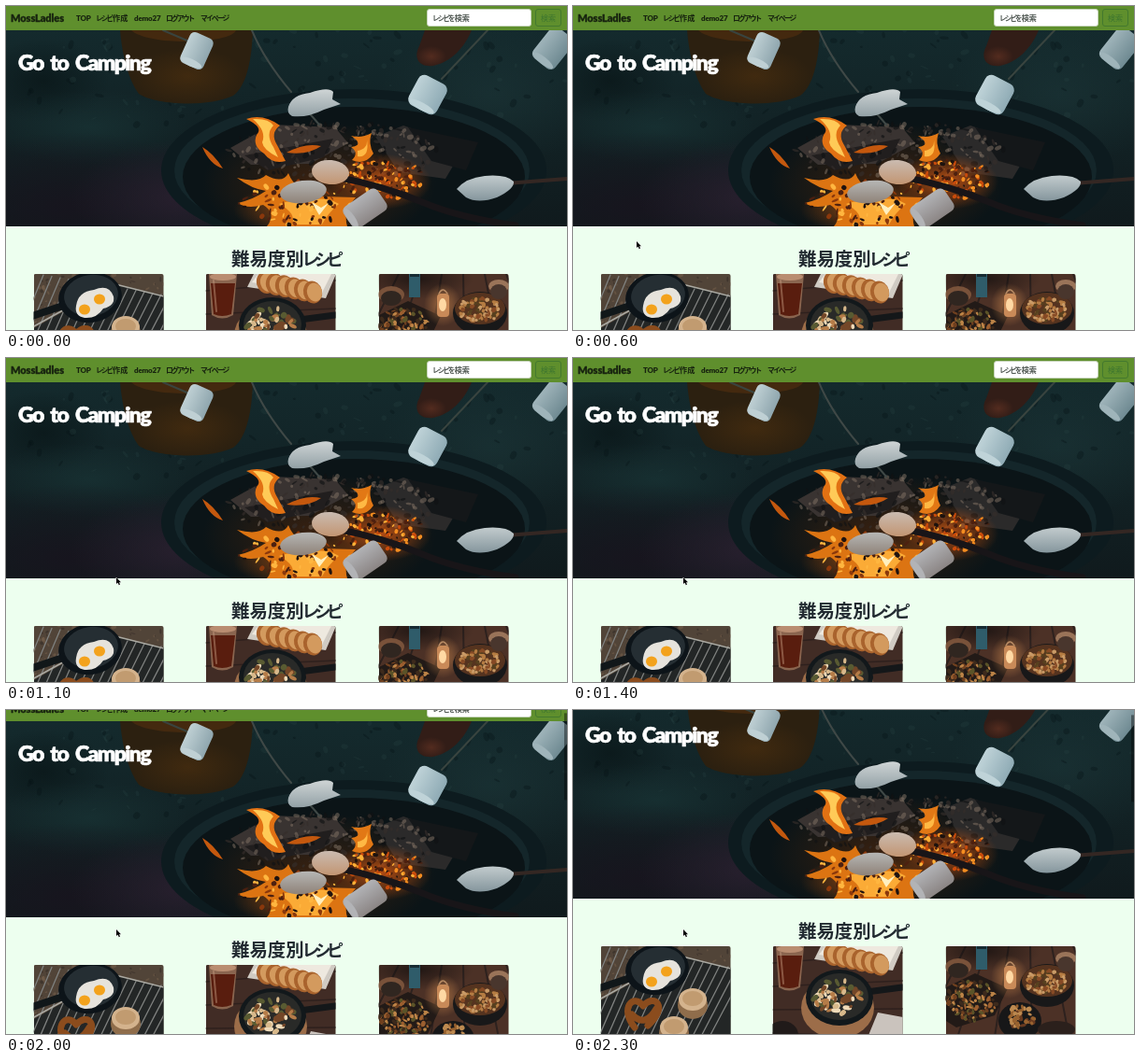
An HTML page with a canvas that plays this animation: 600 px wide and 347 px high, repeating every 2.4 s.

```html
<!DOCTYPE html>
<html lang="ja">
<head>
<meta charset="utf-8">
<title>Camping recipes</title>
<style>
html, body { margin: 0; width: 100%; height: 100%; overflow: hidden; background: #edffef; }
canvas { display: block; }
</style>
</head>
<body>
<canvas id="stage" width="600" height="347"></canvas>
<script>
const LOOP = 2400, STEP = 100;
const stage = document.getElementById('stage').getContext('2d');
const page = document.createElement('canvas');
page.width = 600;
page.height = 400;
const c = page.getContext('2d');

let seed = 7;
const rnd = () => (seed = (seed * 16807) % 2147483647) / 2147483647;
const between = (a, b) => a + (b - a) * rnd();
const pick = list => list[Math.floor(rnd() * list.length)];

function rect(color, x, y, w, h) {
  c.fillStyle = color;
  c.fillRect(x, y, w, h);
}
function oval(color, x, y, rx, ry, turn = 0) {
  c.fillStyle = color;
  c.beginPath();
  c.ellipse(x, y, rx, ry, turn, 0, Math.PI * 2);
  c.fill();
}
function shape(color, d) {
  c.fillStyle = color;
  c.fill(new Path2D(d));
}
function line(color, width, d) {
  c.strokeStyle = color;
  c.lineWidth = width;
  c.lineCap = c.lineJoin = 'round';
  c.stroke(new Path2D(d));
}
function roundBox(x, y, w, h, r, fill, stroke) {
  c.beginPath();
  c.roundRect(x, y, w, h, r);
  if (fill) { c.fillStyle = fill; c.fill(); }
  if (stroke) { c.strokeStyle = stroke; c.lineWidth = 1; c.stroke(); }
}
function fade(top, bottom, y1, y2) {
  const g = c.createLinearGradient(0, y1, 0, y2);
  g.addColorStop(0, top);
  g.addColorStop(1, bottom);
  return g;
}
function glow(color, x, y, rx, ry) {
  c.save();
  c.translate(x, y);
  c.scale(rx, ry);
  const g = c.createRadialGradient(0, 0, 0, 0, 0, 1);
  g.addColorStop(0, color);
  g.addColorStop(1, color.slice(0, 7) + '00');
  c.fillStyle = g;
  c.fillRect(-1, -1, 2, 2);
  c.restore();
}
function scatter(count, colors, x, y, rx, ry, min, max) {
  for (let i = 0; i < count; i++) {
    const a = between(0, Math.PI * 2), d = Math.sqrt(rnd());
    oval(pick(colors), x + Math.cos(a) * rx * d, y + Math.sin(a) * ry * d,
      between(min, max), between(min, max) * 0.7, between(0, 3));
  }
}
function clipped(x, y, w, h, r, paint) {
  c.save();
  c.beginPath();
  c.roundRect(x, y, w, h, r);
  c.clip();
  paint();
  c.restore();
}

function latin(text, x, y, size, color, spacing = 0, weight = 0, gap = 0) {
  c.font = `900 ${size}px Lato, sans-serif`;
  c.letterSpacing = spacing + 'px';
  c.wordSpacing = gap + 'px';
  c.fillStyle = c.strokeStyle = color;
  c.lineWidth = weight;
  c.lineJoin = 'round';
  if (weight) c.strokeText(text, x, y);
  c.fillText(text, x, y);
  c.letterSpacing = c.wordSpacing = '0px';
}
// Kana are smaller and set tighter than kanji.
function japanese(text, x, y, size, color, weight = 700) {
  c.fillStyle = color;
  for (const run of text.match(/[ぁ-ヿ]+|[^ぁ-ヿ]+/g)) {
    const kana = /[ぁ-ヿ]/.test(run);
    const em = kana ? size * 0.92 : size;
    c.font = `${weight} ${em}px "Noto Sans CJK JP", "Noto Sans CJK", sans-serif`;
    c.letterSpacing = (kana ? -0.25 * em : 0) + 'px';
    c.fillText(run, x - (kana ? 0.12 * em : 0), y);
    x += run.length * em * (kana ? 0.75 : 1);
  }
  c.letterSpacing = '0px';
}

function marshmallow(x, y, w, h, turn, light, shade) {
  c.save();
  c.translate(x, y);
  c.rotate(turn);
  roundBox(-w / 2, -h / 2, w, h, Math.min(w, h) * 0.22, fade(light, shade, -h / 2, h / 2));
  oval(light, 4 - w / 2, 0, 4, h * 0.44);
  c.restore();
}

function campfire() {
  rect(fade('#142a2d', '#101a1d', 26, 236), 0, 26, 600, 210);
  glow('#0a1719cc', 40, 80, 70, 45);
  glow('#1b3a3b88', 90, 130, 110, 40);
  glow('#1d383a88', 520, 95, 120, 75);
  glow('#17151eff', 70, 215, 180, 80);
  glow('#2b2030dd', 190, 205, 120, 62);
  scatter(130, ['#29454344', '#07121455'], 300, 80, 310, 60, 1, 5);

  shape('#2c2010', 'M122 26H264C263 55 258 85 243 96C215 109 160 106 142 94C130 78 124 50 122 26Z');
  shape('#44290f', 'M134 26H246C240 41 152 43 134 26Z');
  glow('#57350f77', 195, 75, 60, 30);
  shape('#321d17', 'M448 26H498C490 45 476 60 457 64C440 66 436 54 442 43Z');
  glow('#70382688', 455, 54, 16, 11);

  oval('#0d1b1f', 372, 176, 206, 87);
  oval('#14262a', 370, 176, 190, 77);
  oval('#0b1417', 372, 183, 183, 75);
  glow('#54290caa', 335, 190, 125, 65);

  shape('#393331', 'M240 152L285 127L352 130L366 147L325 169L262 170Z');
  shape('#211e1e', 'M255 160L350 142L340 162L280 176Z');
  shape('#2b2a2a', 'M395 140L425 128L490 151L470 185L420 178Z');
  shape('#141719', 'M430 130L505 146L492 176L455 166Z');
  scatter(220, ['#80706488', '#111214aa', '#352d2aaa'], 350, 156, 115, 32, 1, 4);
  glow('#d95a12cc', 400, 188, 55, 30);
  glow('#d9641099', 315, 218, 72, 27);
  scatter(130, ['#f58d20', '#c84b0c', '#1c120e', '#ffb036', '#4d200f'], 403, 186, 44, 23, 1, 3.4);

  shape('#e27113', 'M257 121Q275 115 293 128Q282 136 290 149L299 166Q285 170 276 158Q263 150 268 138Q276 130 257 121Z');
  shape('#ffca57', 'M264 121Q281 120 286 128Q277 137 286 151L291 162Q275 154 274 146Q279 134 264 121Z');
  shape('#e27815', 'M369 139Q380 142 391 136Q387 147 393 158Q384 171 370 165Q378 157 369 151Q384 149 369 139Z');
  shape('#ffb944', 'M376 155Q387 153 386 143Q389 163 376 161Z');
  shape('#c4580e', 'M210 151Q222 158 232 174Q218 170 210 151ZM300 157Q320 146 337 150Q323 160 300 157Z');
  shape('#dc7412', 'M247 184Q270 190 278 181Q296 191 302 179Q309 198 337 204L374 205Q360 221 365 236H279Q290 222 275 213Q258 218 248 211Q265 207 278 198Q263 196 247 184Z');
  shape('#fbab36', 'M292 212Q308 206 320 212Q337 201 356 212Q344 222 338 234H306Q311 222 292 212Z');
  scatter(75, ['#20130f', '#4d2010', '#8a380c', '#ffb640'], 310, 212, 62, 23, 1, 4);
  shape('#fff0c0', 'M327 210L337 216L345 211L335 224Z');

  line('#3f4846', 2, 'M263 26C272 48 284 67 305 92M322 112L335 127');
  line('#39443f', 2, 'M168 26L196 38M466 78L515 26');
  line('#342723', 4, 'M535 190L600 185');
  line('#181518', 7, 'M353 183Q405 193 445 210T545 235');

  marshmallow(204, 48, 36, 27, -1.15, '#bfd0d4', '#8fa6ae');
  marshmallow(451, 95, 36, 34, -1.08, '#bfd3d8', '#8fabb5');
  marshmallow(585, 45, 42, 30, -0.9, '#9fb4ba', '#6f8a92');
  shape(fade('#cdd3d4', '#93a1a6', 90, 118),
    'M302 108Q306 95 325 93Q345 86 350 92L349 100L358 105L340 111Q322 120 306 118Q300 115 302 108Z');
  shape(fade('#c3ccce', '#84959c', 181, 209),
    'M482 196Q492 184 512 182Q535 180 543 188Q544 196 525 205Q505 212 492 205Z');
  oval(fade('#b4b4b2', '#8d8076', 188, 212), 318, 199, 25, 12, -0.12);
  oval(fade('#cabbb0', '#c29470', 165, 192), 347, 178, 20, 13, 0.1);
  marshmallow(384, 217, 44, 28, -0.6, '#b2b3b6', '#8b8584');
}

function breakfast() {
  rect('#514438', 30, 287, 139, 110);
  scatter(160, ['#76614c88', '#30292588'], 99, 330, 85, 60, 0.7, 3);
  shape('#232626', 'M113 298L169 310V397H30V345Z');
  for (let i = 0; i < 17; i++) {
    const x = 40 + i * 9;
    line('#7f817f', 1.3, `M${x} ${288 + i * 1.5}L${x - 45} 397`);
  }
  line('#aaa9a2', 1.5, 'M30 343L113 297L169 311');
  line('#111719', 8, 'M64 320L28 332');
  oval('#0d1419', 90, 312, 34, 27, -0.15);
  oval('#252e33', 91, 310, 29, 22, -0.15);
  shape('#e6e3dc', 'M75 321Q77 306 94 304Q110 297 115 311Q117 321 104 324Q97 335 84 334Q73 332 75 321Z');
  oval('#f3a21c', 100, 314, 6, 5.5);
  oval('#f3a21c', 84, 325, 6, 5.5);
  line('#8b4c1d', 7, 'M66 374C49 353 65 337 75 351C87 337 103 352 80 372M63 360Q77 375 89 354');
  for (const [x, y] of [[128, 346], [108, 376]]) {
    oval('#8f6d4b', x, y + 4, 16, 15);
    oval('#d4b38d', x, y - 2, 15, 12);
    oval('#c19b70', x, y - 3, 11, 8);
  }
}

function dinner() {
  rect('#412c25', 214, 287, 139, 110);
  for (let i = 0; i < 5; i++) line('#2e201d', 1.5, `M214 ${305 + i * 25}L353 ${294 + i * 30}`);
  shape('#d0cbc3', 'M265 287H353L342 313L258 301Z');
  shape('#eee9df', 'M270 287H348L338 307L263 296Z');
  for (let i = 0; i < 6; i++) {
    oval('#a9632d', 278 + i * 10, 296 + i * 2.1, 10, 12, -0.25);
    oval('#d39a5e', 280 + i * 10, 296 + i * 2.1, 8, 10, -0.25);
  }
  shape('#8a654f', 'M217 287H247L243 331Q231 338 220 331Z');
  shape('#591d0e', 'M219 297H245L241 330Q231 334 222 330Z');
  oval('#b98d71', 232, 290, 14, 4);
  line('#c59b8077', 2, 'M222 294L225 327');
  oval('#9c6d49', 283, 353, 39, 33);
  shape('#cac3bd', 'M326 358L353 363V397H310Z');
  line('#141719', 7, 'M314 336L352 331');
  oval('#12181b', 285, 342, 36, 30);
  oval('#292a28', 285, 341, 31, 25);
  scatter(60, ['#d8b98b', '#b57c48', '#efdab8', '#595b32', '#744728'], 283, 341, 25, 18, 2, 5);
  oval('#201a19', 224, 382, 17, 15);
}

function feast() {
  rect('#4c3126', 399, 287, 139, 110);
  for (let i = 0; i < 6; i++) line('#2d211e', 2, `M${420 + i * 23} 287L${365 + i * 42} 397`);
  glow('#120e0ebb', 440, 292, 60, 22);
  oval('#79523a', 412, 309, 14, 9);
  oval('#302620', 412, 313, 11, 8);
  shape('#2f5c6a', 'M431 287H443V312H431Z');
  rect('#172b32', 432, 287, 10, 3);
  shape('#221a17', 'M399 331L430 316L465 332L451 361L410 374L399 367Z');
  scatter(150, ['#9c5f2f', '#70401f', '#5b5328', '#bd8447', '#3d2a1c'], 426, 345, 27, 22, 1, 3.5);
  glow('#f0a05888', 467, 320, 20, 23);
  roundBox(461, 308, 13, 25, 4, '#c98a58');
  oval('#ffd9a4', 467, 320, 4, 7);
  line('#b78a63', 1.5, 'M463 308Q467 300 472 308');
  oval('#181819', 507, 329, 29, 23);
  oval('#55331f', 507, 324, 27, 17);
  scatter(85, ['#b57c42', '#864a25', '#c99a66', '#57401f'], 507, 325, 22, 13, 1.5, 3.5);
  oval('#9a7459', 527, 300, 11, 7);
  oval('#49362d', 527, 306, 9, 8);
  oval('#171718', 478, 367, 23, 20);
  scatter(45, ['#98622f', '#bd8a50', '#683a20'], 478, 363, 16, 12, 1.5, 4);
  oval('#2b201c', 517, 376, 20, 9);
}

function navigation() {
  const ink = '#17230f';
  rect('#5f8f2d', 0, 0, 600, 26);
  latin('MossLadles', 5, 17, 11, ink, -0.1, 0.3);
  latin('TOP', 75, 16, 8, ink, -0.3);
  japanese('レシピ作成', 97, 16, 8.2, ink);
  latin('demo27', 137, 16, 8, ink, -0.2);
  japanese('ログアウト', 172, 16, 8.5, ink);
  japanese('マイページ', 209, 16, 8.5, ink);
  roundBox(450.5, 3.5, 111, 18, 2.5, '#ffffff', '#c7d4bb');
  japanese('レシピを検索', 457, 16, 8.2, '#4d5550');
  roundBox(566.5, 3.5, 27, 18, 2.5, null, '#43782e');
  japanese('検索', 572, 16, 8, '#3b742f', 500);
}

function buildPage() {
  rect('#edffef', 0, 0, 600, 400);
  clipped(0, 26, 600, 210, 0, campfire);
  latin('Go to Camping', 13, 69, 23, '#ffffff', -1.6, 0.6, 4);
  japanese('難易度別レシピ', 241, 278, 19.4, '#222a31', 900);
  [[30, breakfast], [214, dinner], [399, feast]].forEach(([x, paint]) =>
    clipped(x - 0.5, 287, 139, 120, 2, paint));
  navigation();
}

function drawPointer(x, y) {
  const arrow = new Path2D('M0 0V7L1.6 5.6L2.8 8.2L4 7.6L2.9 5.2H5Z');
  stage.save();
  stage.translate(x, y);
  stage.strokeStyle = 'rgba(255, 255, 255, 0.8)';
  stage.stroke(arrow);
  stage.fillStyle = '#000000';
  stage.fill(arrow);
  stage.restore();
}

const progress = (t, start, end) => Math.max(0, Math.min(1, (t - start) / (end - start)));
const ease = p => p * p * (3 - 2 * p);

function draw(now) {
  const time = Math.floor((now % LOOP) / STEP) * STEP;
  const scroll = Math.round(Math.max(0, time - 1800) * 0.0685);
  stage.drawImage(page, 0, -scroll);
  if (scroll) {
    stage.fillStyle = 'rgba(0, 0, 0, 0.4)';
    stage.fillRect(597, 2 + scroll / 10, 3, 93);
  }
  if (time >= 300) {
    const p = ease(progress(time, 300, 900));
    drawPointer(18 + 100 * p, 269 - 34 * p);
  }
  requestAnimationFrame(draw);
}

buildPage();
requestAnimationFrame(draw);
</script>
</body>
</html>
```
